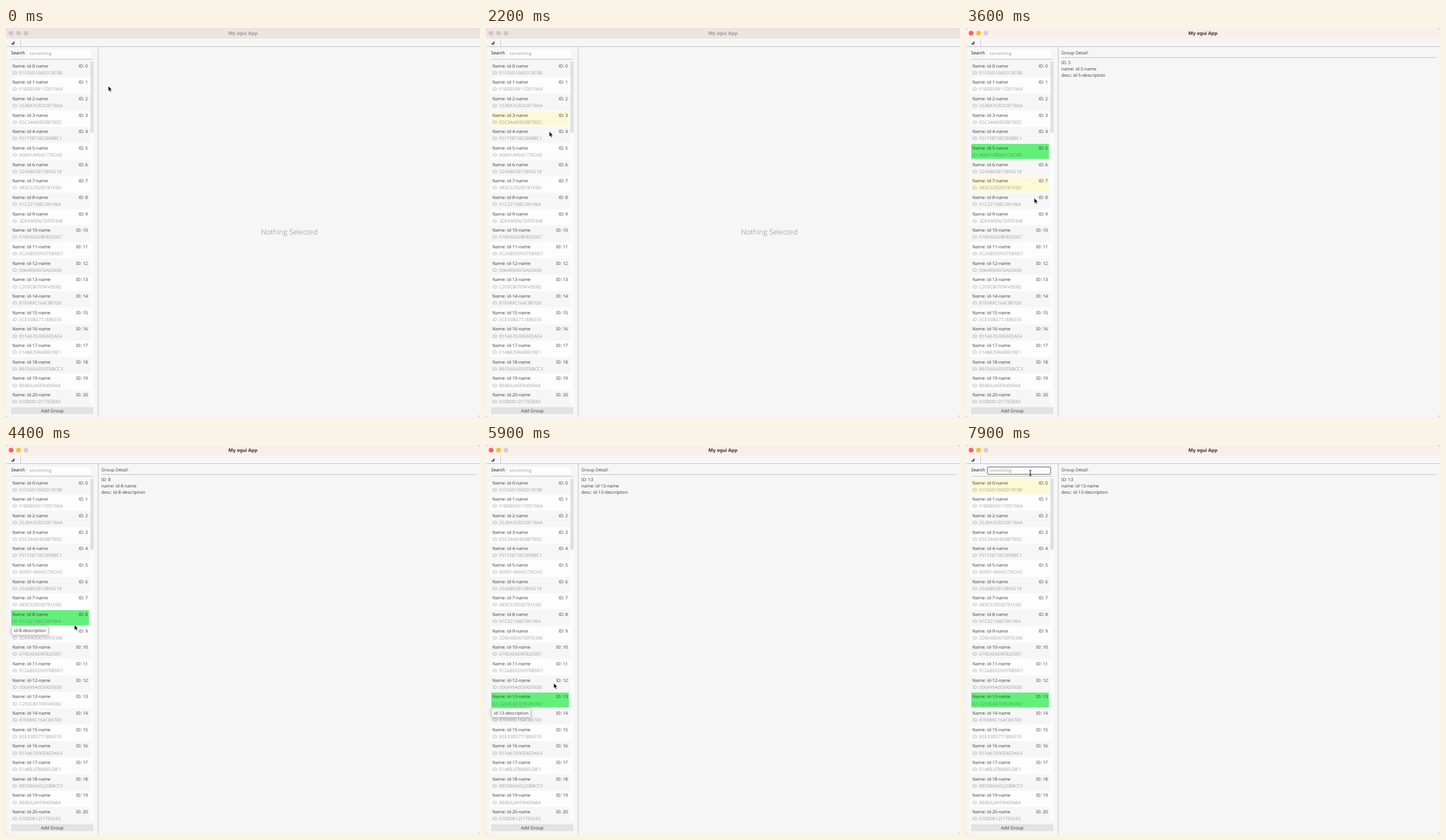
An HTML page that plays this animation: 825x678 px, repeating every 8 s.

```html
<!DOCTYPE html>
<html lang="en">
<head>
<meta charset="utf-8">
<title>My egui App</title>
<style>
  html, body { margin: 0; width: 100%; height: 100%; overflow: hidden; background: #d4d4d4; }
  svg { display: block; width: 825px; height: 678px; }
  text { font: 400 7.7px "Open Sans", "Noto Sans", sans-serif; fill: #3c3c3c; text-rendering: geometricPrecision; white-space: pre; }
  .weak { font-size: 7.85px; fill: rgba(60, 60, 60, .47); }
  .end { text-anchor: end; }
  .mid { text-anchor: middle; }
  .line { stroke: #c2c2c2; stroke-width: 1; }
  #label { font-size: 7.6px; fill: #101010; }
  #title { font: 700 8.2px Inter, "Liberation Sans", sans-serif; }
  #empty { font-size: 12.9px; font-weight: 300; fill: #858585; }
  #tip { filter: drop-shadow(0 1.5px 3px rgba(0, 0, 0, .26)); }
</style>
</head>
<body>
<svg viewBox="0 0 825 678">
  <defs>
    <clipPath id="frame"><rect width="825" height="678" rx="6"/></clipPath>
    <clipPath id="listArea"><rect y="56" width="160" height="600.5"/></clipPath>
  </defs>
  <g clip-path="url(#frame)">
    <rect width="825" height="678" fill="#f6f6f6"/>
    <rect id="bar" width="825" height="18.5"/>
    <g id="lights">
      <circle cx="8.8" cy="9" r="4.1"/>
      <circle cx="21.8" cy="9" r="4.1"/>
      <circle cx="34.8" cy="9" r="4.1"/>
    </g>
    <text id="title" class="mid" x="412.5" y="11.8">My egui App</text>
    <path d="M13 22.8A3.2 3.2 0 1 1 8.8 27.2A3.5 3.5 0 0 0 13 22.8Z" fill="#3c3c3c"/>
    <path class="line" d="M25.5 20V31.5M0 32.5H825M160.5 33V678M9 54.5H152"/>

    <text id="label" x="9" y="45.8">Search</text>
    <rect id="search" x="37.3" y="38.3" width="110" height="12.8" rx="1.5" fill="#fdfdfd"/>
    <text class="weak" x="40.7" y="46.9">something</text>

    <rect x="147" y="57" width="5.5" height="599.5" fill="#fcfcfc"/>
    <rect x="147" y="58.5" width="5.5" height="124" rx="1" fill="#e0e0e0"/>
    <g id="list" clip-path="url(#listArea)">
      <text>ID: 51F26D196D319C9B</text>
      <text>ID: F1BEB50611DD19AA</text>
      <text>ID: 253BA703DC0F1BAA</text>
      <text>ID: E5C34440EEB87BDC</text>
      <text>ID: F5175B73ECB9BBC1</text>
      <text>ID: A0691490A5176CAD</text>
      <text>ID: 324AB02B13BF6218</text>
      <text>ID: 483C529200781E6D</text>
      <text>ID: 91C22158EC961964</text>
      <text>ID: 2DEA40D67DFFD34E</text>
      <text>ID: 670EAE6D8FB2D0E7</text>
      <text>ID: FC2AB5FD937D89D7</text>
      <text>ID: 006499A0C6AD0600</text>
      <text>ID: C203C80709F49D82</text>
      <text>ID: 87E989C164C887D0</text>
      <text>ID: ECE33BD771886576</text>
      <text>ID: B15467D3EE4EDAE4</text>
      <text>ID: E148B2F86BBFC8E1</text>
      <text>ID: BEFD60A052CBBCC3</text>
      <text>ID: BE8662AFF940FA64</text>
      <text>ID: 07EB0B12F77E5692</text>
    </g>
    <rect x="9" y="661" width="143" height="12" rx="1" fill="#e2e2e2"/>
    <text class="mid" x="80.5" y="669.6">Add Group</text>

    <text id="empty" class="mid" x="493" y="360">Nothing Selected</text>
    <g id="detail">
      <text x="166" y="45.8">Group Detail:</text>
      <path class="line" d="M166 51.5H819.5"/>
      <text class="field" x="166" y="62.8"></text>
      <text class="field" x="166" y="74.1"></text>
      <text class="field" x="166" y="85.4"></text>
    </g>

    <g id="tip">
      <rect x="9.8" y="27.5" height="15.8" rx="3" fill="#fafafa" stroke="#b9b9b9" stroke-width=".8"/>
      <text x="13.5" y="38.4"></text>
    </g>
    <path id="arrow" d="M0 0V9.4L2.2 7.4L3.8 10.9L5.5 10.1L3.9 6.8H6.8Z" fill="#000" stroke="#fff" stroke-width=".8"/>
    <path id="beam" d="M-2 -4Q0 -4 0 -2.5Q0 -4 2 -4M0 -2.5V4M-2 5.5Q0 5.5 0 4Q0 5.5 2 5.5M-1 2H1" fill="none" stroke="#111"/>
  </g>
</svg>
<script>
const LOOP = 8000, TICK = 100;
const LIST_TOP = 58.5, PITCH = 28.68, ROW_HEIGHT = 26.3;
const GREEN = '#62f07a', YELLOW = '#fcfad5';

const linear = k => k;
const easeOut = k => 1 - (1 - k) ** 2;

// The pointer glides between resting places
const home = { x: 178, y: 101 };
const glides = [
  { from: 1000, to: 1800, x: 110, y: 78, ease: linear },
  { from: 1900, to: 2450, x: 110, y: 207, ease: easeOut },
  { from: 3200, to: 3700, x: 119, y: 300, ease: easeOut },
  { from: 4375, to: 4875, x: 119, y: 437, ease: easeOut },
  { from: 5890, to: 6050, x: 110, y: 254, ease: easeOut },
  { from: 6100, to: 7000, x: 108, y: 183, ease: easeOut },
  { from: 7000, to: 7900, x: 112, y: 48, ease: linear }
];
// Rows the pointer stops on: the tooltip opens, a click may follow, the tooltip closes
const stops = [
  { row: 5, open: 2700, click: 2800, close: 3400 },
  { row: 8, open: 3900, click: 4000, close: 4500 },
  { row: 13, open: 5100, click: 5400, close: 6000 },
  { row: 4, open: 6900, close: 7100 }
];

const $ = id => document.getElementById(id);
const show = (el, on) => el.setAttribute('visibility', on ? 'visible' : 'hidden');
const moveTo = (el, x, y) => el.setAttribute('transform', `translate(${x} ${y})`);
const rowTop = i => LIST_TOP + i * PITCH;

function set(el, attrs) {
  for (const key in attrs) el.setAttribute(key, attrs[key]);
  return el;
}

function add(parent, tag, attrs, content = '') {
  const el = set(document.createElementNS('http://www.w3.org/2000/svg', tag), attrs);
  el.textContent = content;
  return parent.appendChild(el);
}

const marks = [...$('list').children].map((hash, i) => {
  const row = add($('list'), 'g', {});
  moveTo(row, 0, rowTop(i));
  if (i % 2) add(row, 'rect', { x: 7.5, y: -1.1, width: 139.5, height: PITCH, fill: '#fdfdfd' });
  const mark = add(row, 'rect', { x: 9, width: 135.3, height: ROW_HEIGHT });
  add(row, 'text', { x: 11, y: 10 }, `Name: id-${i}-name`);
  add(row, 'text', { x: 142.5, y: 10, class: 'end' }, `ID: ${i}`);
  row.append(set(hash, { x: 11, y: 22.2, class: 'weak' }));
  return mark;
});

const lights = [...$('lights').children];
const fields = document.querySelectorAll('.field');
const [tipBox, tipText] = $('tip').children;

function pointer(t) {
  let { x, y } = home;
  for (const glide of glides) {
    if (t < glide.from) break;
    const k = glide.ease(Math.min(1, (t - glide.from) / (glide.to - glide.from)));
    x += (glide.x - x) * k;
    y += (glide.y - y) * k;
  }
  return { x, y };
}

function rowAt({ x, y }) {
  return x < 9 || x > 144 ? -1 : Math.floor((y - LIST_TOP + 1) / PITCH);
}

function render(t) {
  const { x, y } = pointer(t);
  const hovered = rowAt(pointer(t - TICK)); // row highlight trails by one tick
  const selected = stops.filter(s => s.click <= t).pop()?.row;
  const focused = selected !== undefined;
  const inSearch = x > 37 && x < 148 && y > 38 && y < 51;

  $('bar').setAttribute('fill', focused ? '#fceeeb' : '#ede3e1');
  $('title').style.fill = focused ? '#3b3534' : '#a1999a';
  const colors = focused ? ['#fe5f57', '#febc2e', '#d8cecc'] : Array(3).fill('#d0c7c5');
  lights.forEach((el, i) => el.setAttribute('fill', colors[i]));

  marks.forEach((el, i) => {
    el.setAttribute('fill', i === selected ? GREEN : i === hovered ? YELLOW : 'none');
  });

  show($('empty'), !focused);
  show($('detail'), focused);
  const lines = [`ID: ${selected}`, `name: id-${selected}-name`, `desc: id-${selected}-description`];
  fields.forEach((el, i) => { el.textContent = lines[i]; });

  const stop = stops.find(s => t >= s.open && t < s.close);
  show($('tip'), stop);
  if (stop) {
    moveTo($('tip'), 0, rowTop(stop.row));
    tipText.textContent = `id-${stop.row}-description`;
    tipBox.setAttribute('width', tipText.getComputedTextLength() + 7.6);
  }

  $('search').setAttribute('stroke', inSearch ? '#555' : 'none');
  show($('arrow'), !inSearch);
  show($('beam'), inSearch);
  moveTo($('arrow'), x, y);
  moveTo($('beam'), x, y);
}

const start = performance.now();
function frame() {
  const t = (performance.now() - start) % LOOP;
  render(Math.floor(t / TICK) * TICK);
  requestAnimationFrame(frame);
}
frame();
</script>
</body>
</html>
```
